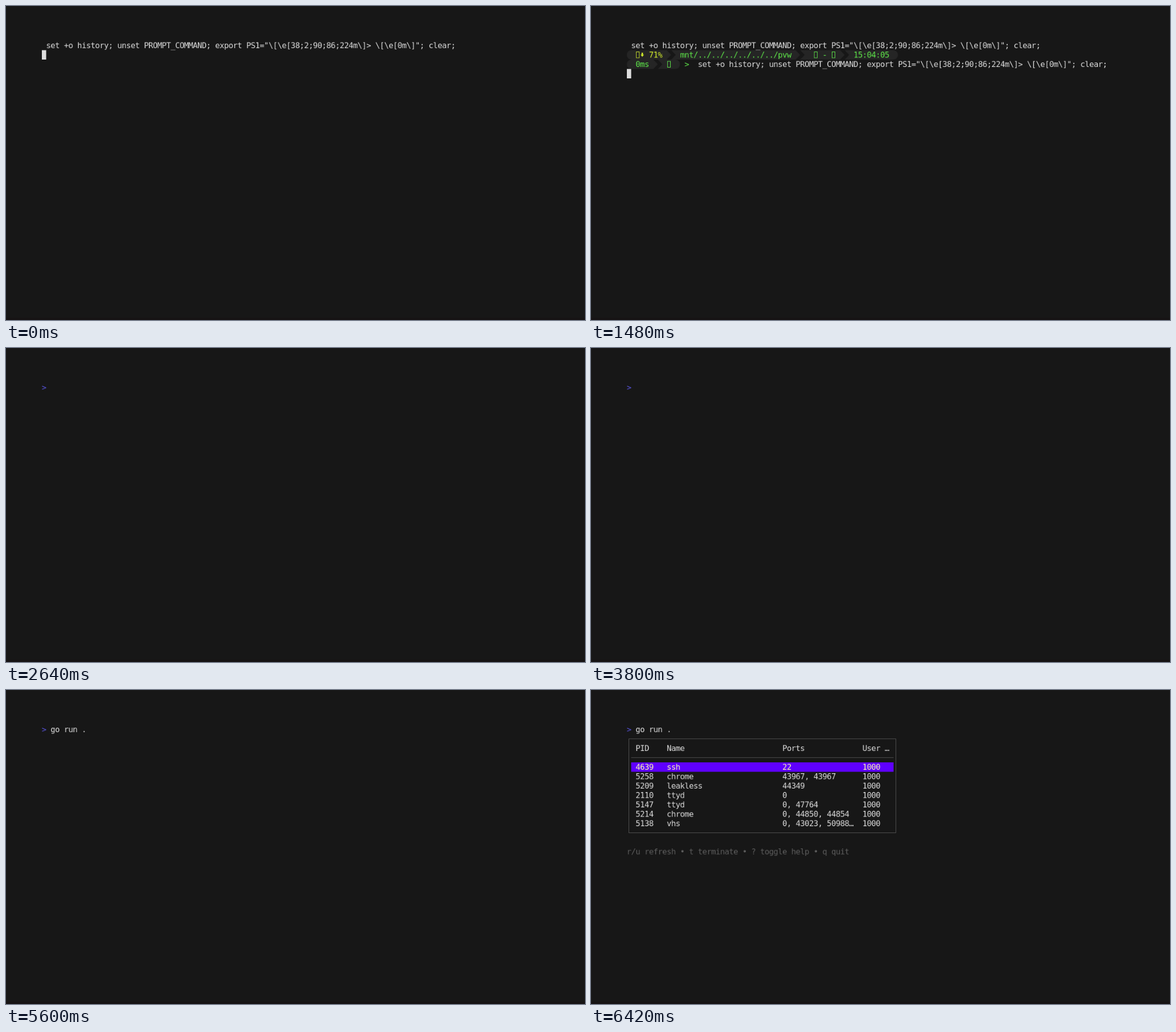
Recreate the animation shown at these times as an HTML page with a canvas. Size 1017 by 551 pixels, loop 8000 ms.

```html
<!DOCTYPE html>
<html lang="en">
<head>
<meta charset="utf-8">
<title>Terminal session</title>
<style>
  html, body { margin: 0; width: 100%; height: 100%; overflow: hidden; background: #171717; }
  canvas { display: block; }
</style>
</head>
<body>
<canvas id="stage" width="1017" height="551"></canvas>
<script>
const LOOP = 8000;
const CELL_W = 9, CELL_H = 19, BASELINE = 15;
const SCALE = 0.868, LEFT = 62.7, TOP = 61;
const FG = '#dddddd', GREEN = '#5fe84a', LIME = '#d0ea2c', PROMPT = '#5a56e0';
const SEGMENT = '#252525', BORDER = '#585858', DIM = '#5e5e5e';

const SETUP = 'set +o history; unset PROMPT_COMMAND; export PS1="\\[\\e[38;2;90;86;224m\\]> \\[\\e[0m\\]"; clear;';
const COMMAND = 'go run .';
const COLUMNS = [2, 9, 35, 53];
const HEADER = ['PID', 'Name', 'Ports', 'User …'];
const ROWS = [
  ['4639', 'ssh', '22', '1000'],
  ['5258', 'chrome', '43967, 43967', '1000'],
  ['5209', 'leakless', '44349', '1000'],
  ['2110', 'ttyd', '0', '1000'],
  ['5147', 'ttyd', '0, 47764', '1000'],
  ['5214', 'chrome', '0, 44850, 44854', '1000'],
  ['5138', 'vhs', '0, 43023, 50988…', '1000']
];

// Each step: start time, screen, cursor [column, row] or null, typed characters
const STEPS = [
  [0, 'setup', [0, 1]],
  [580, 'setup', null],
  [1160, 'setup', [0, 1]],
  [1480, 'status', [0, 3]],
  [2020, 'status', [0, 0]],
  [2040, 'blank', [0, 0]],
  [2060, 'shell', [2, 0], 0],
  [2640, 'shell', null, 0],
  [3220, 'shell', [2, 0], 0],
  [3800, 'shell', null, 0],
  ...[3920, 4060, 4220, 4360, 4520, 4660, 4820, 4960].map((t, i) => [t, 'shell', [3 + i, 0], i + 1]),
  [5020, 'shell', [0, 1], 8],
  [5600, 'shell', null, 8],
  [6180, 'shell', [0, 1], 8],
  [6380, 'shell', null, 8],
  [6400, 'blank', null],
  [6420, 'table', null, 8]
];

const stage = document.getElementById('stage').getContext('2d');
const grid = document.createElement('canvas');
grid.width = 1098;
grid.height = 285;
const g = grid.getContext('2d');

function text(col, row, str, color = FG) {
  g.fillStyle = color;
  [...str].forEach((ch, i) => {
    if (ch !== ' ') g.fillText(ch, (col + i) * CELL_W, row * CELL_H + BASELINE);
  });
}

function block(col, row, cols, color) {
  g.fillStyle = color;
  g.fillRect(col * CELL_W, row * CELL_H, cols * CELL_W, CELL_H);
}

function polygon(points, color) {
  g.fillStyle = color;
  g.beginPath();
  points.forEach(([x, y]) => g.lineTo(x, y));
  g.fill();
}

function cap(col, row, side) {
  const x = (side < 0 ? col + 1 : col) * CELL_W;
  g.fillStyle = SEGMENT;
  g.beginPath();
  g.ellipse(x, (row + 0.5) * CELL_H, CELL_W, CELL_H / 2, 0, -Math.PI / 2, Math.PI / 2, side < 0);
  g.fill();
}

// Pointed end of one segment followed by the notched start of the next
function chevron(col, row) {
  const x = col * CELL_W, y = row * CELL_H, mid = y + CELL_H / 2;
  const a = x + CELL_W, b = a + CELL_W;
  polygon([[x, y], [a, mid], [x, y + CELL_H]], SEGMENT);
  polygon([[a, y], [b, y], [b, y + CELL_H], [a, y + CELL_H], [b, mid]], SEGMENT);
}

// A bar of segments: rounded ends, chevrons at the given columns
function bar(row, end, joints) {
  cap(0, row, -1);
  let from = 1;
  for (const joint of joints) {
    block(from, row, joint - from, SEGMENT);
    chevron(joint, row);
    from = joint + 2;
  }
  block(from, row, end - from, SEGMENT);
  cap(end, row, 1);
}

function missing(col, row, color) {
  g.strokeStyle = color;
  g.lineWidth = 1;
  g.strokeRect(col * CELL_W + 1.5, row * CELL_H + 3.5, 6, 12);
}

function downArrow(col, row, color) {
  const x = col * CELL_W + 4.5, y = row * CELL_H;
  polygon([
    [x - 1.5, y + 5], [x + 1.5, y + 5], [x + 1.5, y + 9], [x + 3.5, y + 9],
    [x, y + 13.5], [x - 3.5, y + 9], [x - 1.5, y + 9]
  ], color);
}

function shell(typed) {
  text(0, 0, '>', PROMPT);
  text(2, 0, COMMAND.slice(0, typed));
}

const screens = {
  blank() {},
  shell,
  setup() {
    text(1, 0, SETUP);
  },
  status() {
    text(1, 0, SETUP);
    bar(1, 60, [9, 38, 48]);
    missing(2, 1, LIME);
    downArrow(3, 1, LIME);
    text(5, 1, '71%', LIME);
    text(12, 1, 'mnt/../../../../../../pvw', GREEN);
    missing(42, 1, GREEN);
    text(44, 1, '-', GREEN);
    missing(46, 1, GREEN);
    text(51, 1, '15:04:05', GREEN);
    bar(2, 11, [6]);
    text(2, 2, '0ms', GREEN);
    missing(9, 2, GREEN);
    text(13, 2, '>', GREEN);
    text(16, 2, SETUP);
  },
  table(typed) {
    shell(typed);
    g.strokeStyle = BORDER;
    g.lineWidth = 1;
    g.strokeRect(4.5, 1.5 * CELL_H, 60 * CELL_W, 10 * CELL_H);
    g.fillStyle = BORDER;
    g.fillRect(CELL_W, 3 * CELL_H + 9, 59 * CELL_W, 1);
    block(1, 4, 59, '#5f00ff');
    const line = (cells, row, color) => cells.forEach((c, i) => text(COLUMNS[i], row, c, color));
    line(HEADER, 2);
    ROWS.forEach((cells, i) => line(cells, 4 + i, i ? FG : '#ffffaf'));
    text(0, 13, 'r/u refresh • t terminate • ? toggle help • q quit', DIM);
  }
};

function draw([, screen, cursor, typed]) {
  g.clearRect(0, 0, grid.width, grid.height);
  g.font = '16px "DejaVu Sans Mono", monospace';
  screens[screen](typed);
  if (cursor) block(cursor[0], cursor[1], 1, FG);
  stage.fillStyle = '#171717';
  stage.fillRect(0, 0, 1017, 551);
  stage.fillStyle = '#161314';
  stage.fillRect(0, 547, 1017, 4);
  stage.drawImage(grid, LEFT, TOP, grid.width * SCALE, grid.height * SCALE);
}

const start = performance.now();
let shown = null;
function tick() {
  const t = (performance.now() - start) % LOOP;
  const step = STEPS.findLast(s => s[0] <= t);
  if (step !== shown) draw(shown = step);
  requestAnimationFrame(tick);
}
tick();
</script>
</body>
</html>
```
